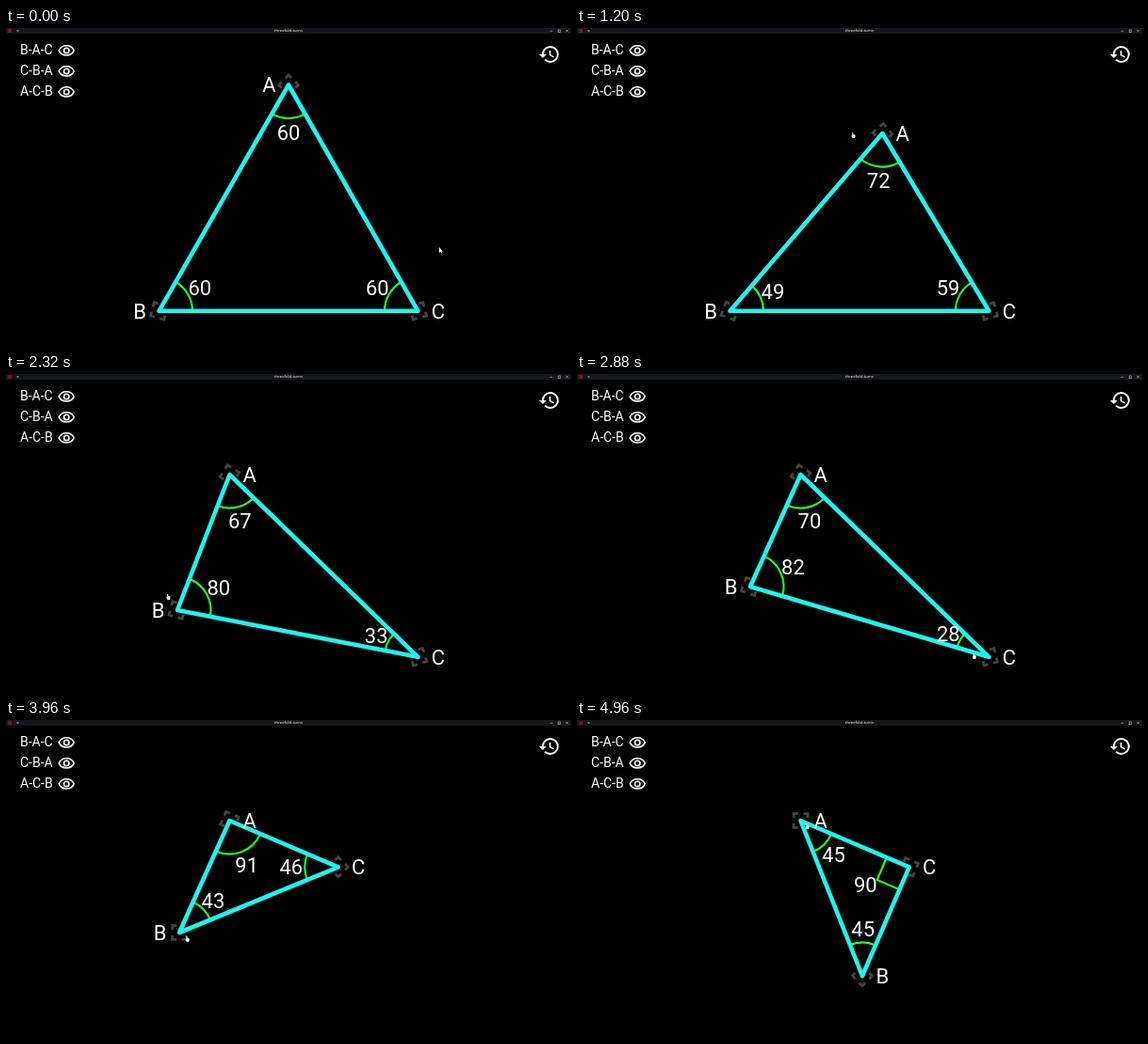
An HTML page with a canvas that plays this animation: 600 px wide and 338 px high, repeating every 5 s.

```html
<!DOCTYPE html>
<html lang="en">
<head>
<meta charset="utf-8">
<title>threefold-turns</title>
<style>
  html, body { margin: 0; height: 100%; overflow: hidden; background: #000; }
  canvas { display: block; }
</style>
</head>
<body>
<canvas id="stage" width="600" height="338"></canvas>
<script>
const ctx = document.getElementById('stage').getContext('2d');
const LOOP = 5000;
const LEAD = 100;          // the triangle trails the pointer by this many ms
const GRAB = [7, 6];       // pointer position relative to the dragged vertex
const POINTER_REST = { at: [461, 236], until: 180 };
const GREEN = '#2f2', CYAN = '#1cf6ee', GREY = '#444', WHITE = '#fff';

const home = { A: [300, 60.5], B: [162.5, 300.8], C: [437.5, 300.8] };
const moves = [
  { vertex: 'A', start: 600, end: 960, to: [381, 118] },
  { vertex: 'A', start: 960, end: 1520, to: [238, 103] },
  { vertex: 'A', start: 1520, end: 1640, to: [237.5, 107] },
  { vertex: 'B', start: 1960, end: 2320, to: [182, 251] },
  { vertex: 'B', start: 2320, end: 2480, to: [158, 222] },
  { vertex: 'B', start: 2480, end: 2720, to: [184, 226] },
  { vertex: 'C', start: 3040, end: 3760, to: [352.8, 156.3] },
  { vertex: 'B', start: 4020, end: 4600, to: [303, 272] },
  { vertex: 'A', start: 5060, end: 5200, to: [237.5, 107] },
];

const add = (p, q) => p.map((v, i) => v + q[i]);
const mix = (p, q, u) => p.map((v, i) => v + (q[i] - v) * u);

function ease(t, start, end) {
  const u = Math.min(1, Math.max(0, (t - start) / (end - start)));
  return u * u * (3 - 2 * u);
}

function position(vertex, t) {
  return moves.filter(m => m.vertex === vertex)
    .reduce((p, m) => mix(p, m.to, ease(t, m.start, m.end)), home[vertex]);
}

// Follows each drag and glides from one drag to the next
function pointer(t) {
  let { at, until } = POINTER_REST;
  for (const { vertex, start, end } of moves) {
    const grip = time => add(position(vertex, time), GRAB);
    if (t < start) return mix(at, grip(start), ease(t, until, start));
    if (t < end) return grip(t);
    at = grip(end);
    until = end;
  }
  return at;
}

function text(str, x, y, size, align = 'center', family = 'Roboto') {
  ctx.font = `${size}px ${family}, sans-serif`;
  ctx.textAlign = align;
  ctx.fillStyle = WHITE;
  ctx.fillText(str, x, y + size * 0.355);
}

function stroke(color, width, path) {
  ctx.strokeStyle = color;
  ctx.lineWidth = width;
  path ? ctx.stroke(path) : ctx.stroke();
}

function polyline(points, color, width, close) {
  ctx.beginPath();
  points.forEach(p => ctx.lineTo(...p));
  if (close) ctx.closePath();
  stroke(color, width);
}

function arc(x, y, radius, from, to, color, width) {
  ctx.beginPath();
  ctx.arc(x, y, radius, from, to, to < from);
  stroke(color, width);
}

function placed(x, y, angle, paint) {
  ctx.save();
  ctx.translate(x, y);
  ctx.rotate(angle);
  paint();
  ctx.restore();
}

const fillPath = d => { ctx.fillStyle = WHITE; ctx.fill(new Path2D(d)); };

function eyeIcon() {
  stroke(WHITE, 1.6, new Path2D('M-8 0C-5-6.8 5-6.8 8 0C5 6.8-5 6.8-8 0z'));
  arc(0, 0, 2.7, 0, 2 * Math.PI, WHITE, 1.6);
}

function historyIcon() {
  arc(0, 0, 8, -Math.PI, 0.75 * Math.PI, WHITE, 2);
  fillPath('M-12 0h8l-4 4z');
  polyline([[-0.25, -4], [-0.25, 0.6], [3.7, 2.9]], WHITE, 1.5);
}

const arrowCursor = () => fillPath('M-1-3V3L.4 1.8 1.4 3.6 2.2 3.2 1.3 1.4H3z');
const handCursor = () => fillPath('M-1.2-3h1v2L2-.5V1.5L1.4 3H-.9L-2.2 .4-1.2 .2z');

function corner([px, py], [qx, qy], [rx, ry]) {
  const start = Math.atan2(qy - py, qx - px);
  const turn = Math.atan2(ry - py, rx - px) - start;
  const sweep = Math.atan2(Math.sin(turn), Math.cos(turn));
  return { x: px, y: py, start, sweep, mid: start + sweep / 2,
           degrees: Math.round(Math.abs(sweep) * 180 / Math.PI) };
}

// Three brackets, open towards the inside of the triangle
function drawHandle({ x, y, mid }) {
  for (let i = 1; i < 4; i++) {
    placed(x, y, mid - Math.PI / 4 + i * Math.PI / 2, () =>
      polyline([[2.8, 7.4], [7.4, 7.4], [7.4, 2.8]], GREY, 2.8));
  }
}

function drawAngle({ x, y, start, sweep, mid, degrees }) {
  if (degrees === 90) {
    placed(x, y, mid - Math.PI / 4, () =>
      polyline([[26, 0], [26, 26], [0, 26]], GREEN, 2.2));
  } else {
    arc(x, y, 35.5, start, start + sweep, GREEN, 2.2);
  }
}

function drawWindow() {
  const box = (color, ...rect) => { ctx.fillStyle = color; ctx.fillRect(...rect); };
  box('#000', 0, 0, 600, 338);
  box('#14171d', 0, 0, 600, 6);
  box('#7a1420', 2, 1, 4, 4);
  box('#778', 11.5, 2, 2, 2);
  text('threefold-turns', 300, 3, 4.2, 'center', 'Noto Sans');
  polyline([[577.5, 3.3], [580.5, 3.3]], '#aaa', 0.7);
  ctx.strokeRect(586.3, 2, 2.4, 2.4);
  polyline([[594.5, 1.8], [597, 4.3]], '#aaa', 0.7);
  polyline([[597, 1.8], [594.5, 4.3]], '#aaa', 0.7);

  ['B-A-C', 'C-B-A', 'A-C-B'].forEach((name, i) => {
    const y = 23.5 + 22 * i;
    text(name, 15, y, 14, 'left');
    placed(64.2, y + 0.4, 0, eyeIcon);
  });
  placed(578, 28, 0, historyIcon);
}

function draw(t) {
  ctx.lineJoin = 'miter';
  drawWindow();
  const [A, B, C] = ['A', 'B', 'C'].map(name => position(name, t));
  const corners = [corner(A, B, C), corner(B, C, A), corner(C, A, B)];
  const labelOnRight = [t > moves[0].start, B[0] > A[0], true];

  corners.forEach(drawHandle);
  corners.forEach(drawAngle);
  ctx.lineJoin = 'round';
  polyline([A, B, C], CYAN, 4.6, true);

  corners.forEach(({ x, y, mid, degrees }, i) => {
    text(degrees, x + 50 * Math.cos(mid), y + 50 * Math.sin(mid) + 0.5, 22);
    text('ABC'[i], x + (labelOnRight[i] ? 21.3 : -20.5), y, 22);
  });
  placed(...pointer(t + LEAD), 0, t < 420 ? arrowCursor : handCursor);
}

const begin = performance.now();
function tick() {
  draw((performance.now() - begin) % LOOP);
  requestAnimationFrame(tick);
}
tick();
</script>
</body>
</html>
```
